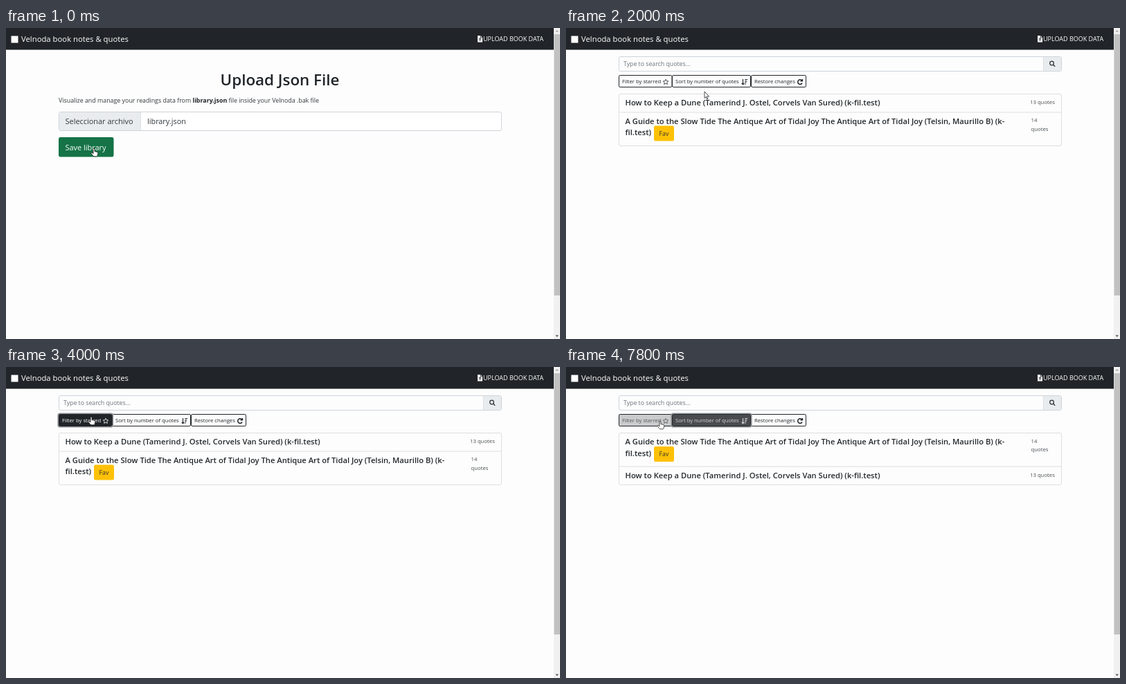
These frames come from a looping animation (800x450 px, 8 s). An HTML page:

```html
<!DOCTYPE html>
<html lang="en">
<head>
<meta charset="utf-8">
<title>Book notes</title>
<style>
  html, body { margin: 0; width: 100%; height: 100%; overflow: hidden; background: #fdfdfd; }
  #stage { position: absolute; left: 0; top: 0; width: 800px; height: 450px; overflow: hidden; }
  svg { position: absolute; left: 0; top: 0; }
  svg, #toast { font-family: "Open Sans", "Noto Sans", sans-serif; }
  text { white-space: pre; }
  .title { font-size: 11.2px; font-weight: 600; fill: #24282c; }
  .hovered .title { fill: #495057; }
  .count { font-size: 7.75px; fill: #484c50; }
  .line { fill: none; stroke: #dedfdf; stroke-width: 1; }
  #toast {
    position: absolute; left: 0; top: 9px; width: 135px; height: 28px; border-radius: 1px;
    box-sizing: border-box; padding-left: 11.5px; font-size: 8.95px; line-height: 28px;
    color: #fff; white-space: nowrap; background: linear-gradient(to right, #0db198, #96c93d);
    box-shadow: 0 2px 4px -1px rgba(0,0,0,.12), 0 6px 20px -2px rgba(77,96,232,.3);
  }
</style>
</head>
<body>
<div id="stage">
  <svg width="800" height="450" viewBox="0 0 800 450">
    <rect width="800" height="450" fill="#fdfdfd"/>
    <rect width="791" height="31.5" fill="#212529"/>
    <rect x="7.5" y="11.5" width="10" height="10" fill="#fff"/>
    <text x="22" y="20.4" font-size="11.3" fill="#fff">Velnoda book notes &amp; quotes</text>
    <path d="M681 11h4.4l2.6 2.6v6.9h-7z" fill="#fff"/>
    <path d="M685.2 11v2.8h2.8M684.5 19v-4M682.7 16.6l1.8-1.9 1.8 1.9" fill="none" stroke="#212529" stroke-width=".9"/>
    <text x="689" y="19.3" font-size="9" fill="#fff">UPLOAD BOOK DATA</text>

    <rect x="791" width="9" height="450" fill="#f1f1f1"/>
    <rect x="791.5" y="9" width="8.5" height="378" fill="#c1c1c1"/>
    <path d="M793.3 5.5l2.4-2.6 2.4 2.6z" fill="#a3a3a3"/>
    <path d="M793.3 444.5l2.4 2.6 2.4-2.6z" fill="#505050"/>

    <g id="upload">
      <text x="395.5" y="83" font-size="22.4" font-weight="600" text-anchor="middle" fill="#212529">Upload Json File</text>
      <text x="76" y="107.6" font-size="8.85" fill="#33383c">Visualize and manage your readings data from <tspan font-weight="700" fill="#212529">library.json</tspan> file inside your Velnoda .bak file</text>
      <rect x="76.5" y="121.5" width="639" height="27" rx="2.5" fill="#fff" stroke="#ced4da"/>
      <path d="M194.5 122H79q-2 0-2 2v22q0 2 2 2h115.5z" fill="#e9ecef"/>
      <path class="line" d="M194.5 122v26"/>
      <text x="85.5" y="139" font-size="10.95" fill="#33383c">Seleccionar archivo</text>
      <text x="204" y="139" font-size="10.85" fill="#33383c">library.json</text>
      <rect x="76" y="158" width="79.5" height="28.5" rx="2.8" fill="#157347"/>
      <text x="85.5" y="176.8" font-size="10.95" fill="#fff">Save library</text>
    </g>

    <g id="library">
      <rect x="76.5" y="41.5" width="639" height="21" rx="2.3" fill="#fdfdfd" stroke="#ced4da"/>
      <path d="M690 42h23q2 0 2 2v16q0 2-2 2h-23z" fill="#e9ecef"/>
      <path class="line" d="M689.5 42v20"/>
      <text x="83" y="55.3" font-size="8.75" fill="#6c757d">Type to search quotes...</text>
      <g fill="none" stroke="#2b2f33" stroke-width="1.25">
        <circle cx="701.5" cy="51" r="2.8"/><path d="M703.6 53.2l2.6 2.6"/>
      </g>
      <g id="buttons"></g>
      <rect id="frame" class="line" x="76.5" y="95.5" width="639" rx="2.5"/>
      <g id="book">
        <rect id="bookFill" x="77" y="96" width="638" height="26" fill="#f8f9fa"/>
        <text class="title" x="85.5" y="112.4">How to Keep a Dune (Tamerind J. Ostel, Corvels Van Sured) (k-fil.test)</text>
        <text class="count" x="670" y="110">13 quotes</text>
      </g>
      <g id="guide">
        <text class="title" x="85.5" y="112.4">A Guide to the Slow Tide The Antique Art of Tidal Joy The Antique Art of Tidal Joy (Telsin, Maurillo B) (k-</text>
        <text class="title" x="85.5" y="128.9">fil.test)</text>
        <rect x="127" y="115" width="29" height="22" rx="2.3" fill="#ffc107"/>
        <text x="134.5" y="129.2" font-size="8.8" fill="#33302a">Fav</text>
        <text class="count" x="671.5" y="109.8">14</text>
        <text class="count" x="671.5" y="122.3">quotes</text>
      </g>
      <path id="divider" class="line" d="M77 95.5h638"/>
    </g>
  </svg>
  <div id="toast">All data loaded succesfully!</div>
  <svg width="800" height="450" viewBox="0 0 800 450">
    <path id="cursor" fill="#fff" stroke="#222" stroke-width=".8" stroke-linejoin="round"/>
  </svg>
</div>
<script>
const $ = id => document.getElementById(id);
const LOOP = 8000;

const CURSORS = {
  hand: 'M-1 .8q1-1.6 2 0V4.6l3.6.8q1.4.4 1.2 2l-.7 3q-.2 1.4-1.4 1.4h-3.6q-.9 0-1.5-1L-4 7.5q.2-1.6 1.6-.8L-1 7.8z',
  arrow: 'M0 0V9.5L2.2 7.5 3.6 11 5 10.4 3.6 7H6.6z'
};

// Row offsets, divider offset and frame height for each list order
const LISTS = {
  all: { book: 0, guide: 26.5, divider: 26.5, height: 75 },
  starred: { book: null, guide: 0, divider: null, height: 49 },
  sorted: { book: 48.5, guide: 0, divider: 48.5, height: 75 }
};

function starPath(cx, cy, outer, inner) {
  const points = Array.from({ length: 10 }, (_, i) => {
    const r = i % 2 ? inner : outer, a = Math.PI * (i / 5 - .5);
    return (cx + r * Math.cos(a)).toFixed(2) + ' ' + (cy + r * Math.sin(a)).toFixed(2);
  });
  return 'M' + points.join('L') + 'z';
}

const BUTTONS = {
  filter: { x: 76.5, w: 76.5, label: 'Filter by starred', icon: starPath(144, 78.2, 4, 1.9), weight: .8 },
  sort: { x: 153.5, w: 113, label: 'Sort by number of quotes',
    icon: 'M255.5 74v7.5M253.7 79.8l1.8 2 1.8-2M258.2 74.5h4M258.2 76.8h3M258.2 79.1h2.2M258.2 81.4h1.2', weight: 1.2 },
  restore: { x: 267.5, w: 79, label: 'Restore changes',
    icon: 'M340.7 76.2A3.3 3.3 0 1 0 341 79.6M341.4 74v2.8h-2.8', weight: 1.5 }
};

for (const [name, b] of Object.entries(BUTTONS)) {
  $('buttons').insertAdjacentHTML('beforeend', `
    <g id="${name}">
      <rect class="ring" x="${b.x - 1.2}" y="67.3" width="${b.w + 2.4}" height="19.4" rx="2.5" fill="none" stroke="#909294" stroke-width="1.8"/>
      <rect class="face" x="${b.x}" y="68.5" width="${b.w}" height="17" rx="1.7" stroke="#212529"/>
      <text x="${b.x + 4.5}" y="80.3" font-size="7.68">${b.label}</text>
      <path d="${b.icon}" fill="none" stroke-width="${b.weight}" stroke-linejoin="round"/>
    </g>`);
  const group = $(name);
  b.ring = group.querySelector('.ring');
  b.face = group.querySelector('.face');
  b.text = group.querySelector('text');
  b.glyph = group.querySelector('path');
}

// Each step lists only what changes: time, cursor x, cursor y, other state
const STEPS = [
  [0, 127, 174, { page: 'upload', cursor: 'hand', list: 'all', focus: '', filter: 0, sort: 0, restore: 0, toast: 0, top: 9, hover: false }],
  [400, 127, 174, { page: 'library', cursor: 'arrow', toast: .6, top: -8 }],
  [600, 127, 174, { toast: 1, top: 9 }],
  [800, 145, 166],
  [1000, 190, 142, { cursor: 'hand' }],
  [1200, 235, 115, { hover: true }],
  [1400, 252, 104],
  [1800, 235, 100, { toast: .5 }],
  [2000, 200, 92, { toast: 0, hover: false, cursor: 'arrow' }],
  [2200, 150, 80, { cursor: 'hand', filter: .3 }],
  [2400, 123, 72, { filter: 1 }],
  [3000, 123, 72, { list: 'starred', focus: 'filter' }],
  [3800, 123, 72, { list: 'all' }],
  [4200, 155, 74, { filter: .8, sort: .2 }],
  [4400, 225, 77, { filter: 0, sort: 1 }],
  [4600, 290, 78, { sort: .2, restore: 1 }],
  [4800, 250, 78, { sort: .12, restore: .92 }],
  [5000, 241, 77, { sort: 1, restore: 0 }],
  [5200, 237, 77],
  [5400, 237, 77, { list: 'sorted', focus: 'sort' }],
  [7400, 228, 77],
  [7600, 185, 78],
  [7800, 136, 78, { sort: .82, filter: .23 }]
];

let merged = {};
const states = STEPS.map(([time, x, y, change]) => merged = { ...merged, time, x, y, ...change });

const mix = (a, b, k) => a.map((v, i) => Math.round(v + (b[i] - v) * k));
const rgb = c => `rgb(${c.join(',')})`;
const DARK = [33, 37, 41], LIGHT = [253, 253, 253];

function show(el, visible) { el.style.display = visible ? '' : 'none'; }

function place(el, offset) {
  show(el, offset !== null);
  el.setAttribute('transform', `translate(0 ${offset || 0})`);
}

function draw(s) {
  show($('upload'), s.page === 'upload');
  show($('library'), s.page === 'library');

  const list = LISTS[s.list];
  for (const id of ['book', 'guide', 'divider']) place($(id), list[id]);
  $('frame').setAttribute('height', list.height);
  show($('bookFill'), s.hover);
  $('book').classList.toggle('hovered', s.hover);

  for (const [name, b] of Object.entries(BUTTONS)) {
    const ink = rgb(mix(DARK, LIGHT, s[name]));
    b.face.setAttribute('fill', rgb(mix(LIGHT, DARK, s[name])));
    b.text.setAttribute('fill', ink);
    b.glyph.setAttribute('stroke', ink);
    show(b.ring, s.focus === name);
  }
  if (s.focus) $('buttons').append($(s.focus));

  $('toast').style.opacity = s.toast;
  $('toast').style.top = s.top + 'px';
  $('cursor').setAttribute('d', CURSORS[s.cursor]);
  $('cursor').setAttribute('transform', `translate(${s.x} ${s.y})`);
}

let current;
function tick() {
  const t = performance.now() % LOOP;
  const state = states.findLast(s => s.time <= t);
  if (state !== current) draw(current = state);
  requestAnimationFrame(tick);
}
tick();
</script>
</body>
</html>
```
